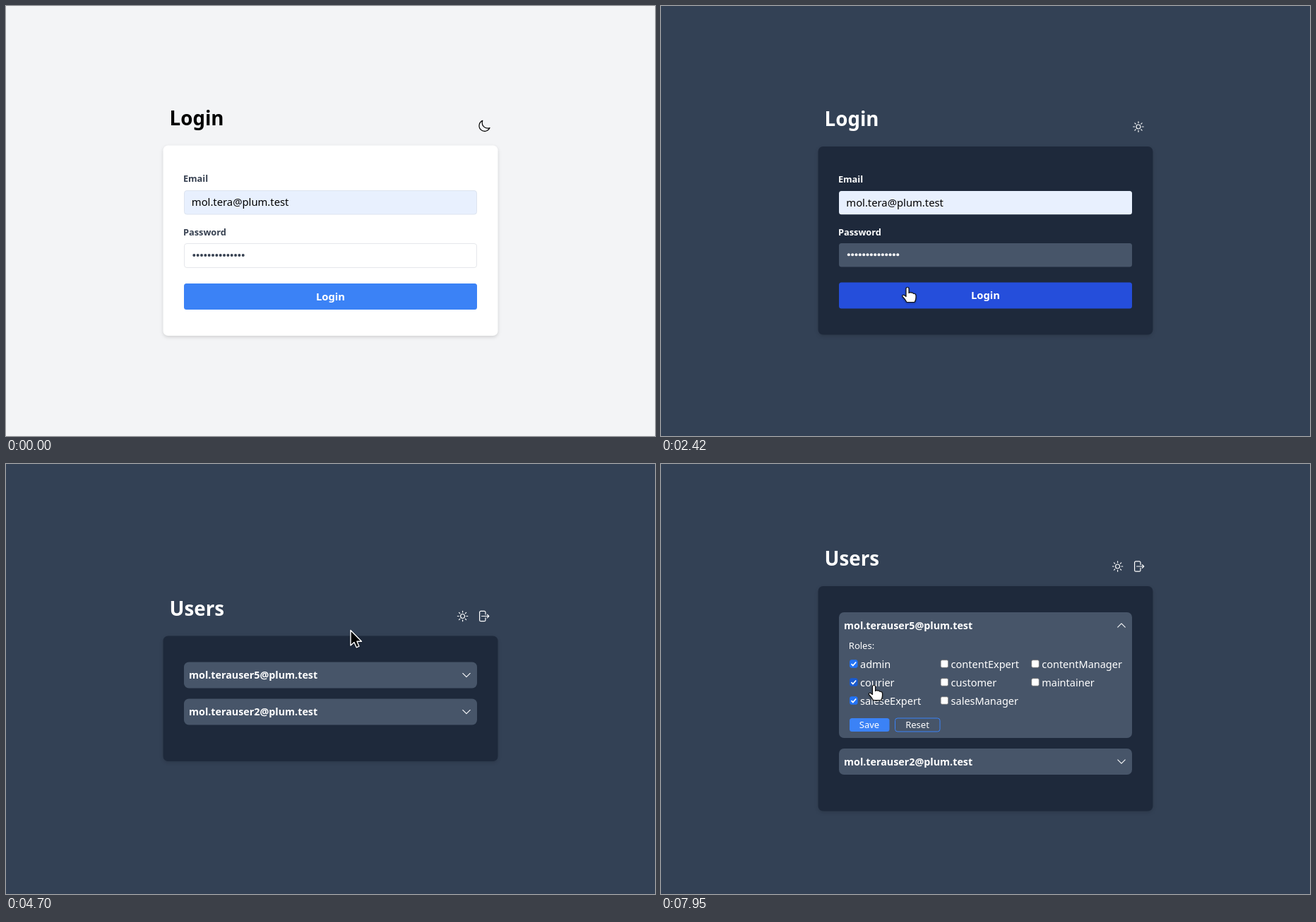
These frames come from a looping animation (919x609 px, 8 s). An HTML page:

```html
<!DOCTYPE html>
<html lang="en">
<head>
<meta charset="utf-8">
<title>Login and user roles</title>
<style>
  html, body { margin: 0; width: 100%; height: 100%; overflow: hidden; }
  svg { display: block; width: 919px; height: 609px; font-family: "Noto Sans", "Open Sans", sans-serif; }
  .card { filter: drop-shadow(0 2px 2.5px rgba(0, 0, 0, .14)); }
  .icon { fill: none; stroke-width: 1.5; stroke-linecap: round; stroke-linejoin: round; }
  #cursor { stroke-linejoin: round; filter: drop-shadow(.5px 1px 1px rgba(0, 0, 0, .35)); }
</style>
</head>
<body>
<svg viewBox="0 0 919 609">
  <g id="page"></g>
  <g id="cursor"></g>
</svg>
<script>
const LOOP = 8000;
const BLUE = '#3b82f6';
const ACCOUNT = 'mol.tera';
const HOST = '@plum.test';
const ROLES = ['admin', 'contentExpert', 'contentManager', 'courier', 'customer',
  'maintainer', 'saleseExpert', 'salesManager'];
const CHECK_TIME = { admin: 0, saleseExpert: 6750, courier: 7780 };

const TOGGLE = 1650, SUBMIT = 4520, LOADED = 4700, EXPAND = 5730;

// Pointer moves: start, end, x, y. Each one eases out from the previous point.
const APPEAR = 150;
const START = [752, 492];
const MOVES = [
  [150, 900, 513, 189],
  [1060, 1530, 671, 165],
  [1880, 2420, 349, 398.5],
  [3090, 3780, 472, 254],
  [3900, 4020, 488, 236.5],
  [4210, 4210, 488, 235.5],
  [4840, 5470, 533.5, 292.5],
  [5940, 6680, 295, 325],
  [7340, 7780, 301.5, 314.5],
  [7950, 7950, 301.5, 313.5]
];

const ICONS = {
  moon: 'M21.75 15A9.72 9.72 0 0 1 18 15.75 9.75 9.75 0 0 1 8.25 6c0-1.33.27-2.6.75-3.75A9.75 9.75 0 1 0 21.75 15Z',
  exit: 'M15.75 9V5.25A2.25 2.25 0 0 0 13.5 3h-6a2.25 2.25 0 0 0-2.25 2.25v13.5A2.25 2.25 0 0 0 7.5 21h6a2.25 2.25 0 0 0 2.25-2.25V15m3 0l3-3-3-3m3 3H9',
  down: 'M19.5 8.25l-7.5 7.5-7.5-7.5',
  up: 'M19.5 15.75l-7.5-7.5-7.5 7.5',
  sun: 'M15.75 12a3.75 3.75 0 1 1-7.5 0 3.75 3.75 0 0 1 7.5 0Z' + Array.from({ length: 8 }, (_, i) => {
    const at = r => `${12 + r * Math.cos(i * Math.PI / 4)} ${12 + r * Math.sin(i * Math.PI / 4)}`;
    return `M${at(6.75)}L${at(9)}`;
  }).join('')
};

const CURSORS = {
  arrow: '<path d="M0 0V21.5L5 17 8.3 24.3 12 22.7 9 15.7H15.5Z" fill="#000" stroke="#fff" stroke-width="1.4"/>',
  hand: '<path d="M-2 2Q-2 0 0 0T2 2V8Q3.5 6.6 5 7.6 7.2 7 8.3 8.8 11.6 8.4 12 11.4V14.5Q12 18 10 21H-1Q-3.5 16.5-7 13-7.8 10.4-5 10.8L-2 13Z" fill="#fff" stroke="#111" stroke-width="1.2"/>',
  text: '<path d="M-3-8Q0-8 0-6 0-8 3-8M0-6V6M-3 8Q0 8 0 6 0 8 3 8" fill="none" stroke="#fff" stroke-width="3"/>' +
    '<path d="M-3-8Q0-8 0-6 0-8 3-8M0-6V6M-3 8Q0 8 0 6 0 8 3 8" fill="none" stroke="#000" stroke-width="1.3"/>'
};

const rect = (x, y, w, h, r, fill, more = '') =>
  `<rect x="${x}" y="${y}" width="${w}" height="${h}" rx="${r}" fill="${fill}" ${more}/>`;
const text = (str, x, y, size, fill, weight = 400, anchor = 'start') =>
  `<text x="${x}" y="${y}" font-size="${size}" font-weight="${weight}" fill="${fill}" text-anchor="${anchor}">${str}</text>`;
const icon = (name, x, y, color, scale = .8) =>
  `<path class="icon" d="${ICONS[name]}" stroke="${color}" transform="translate(${x} ${y}) scale(${scale}) translate(-12 -12)"/>`;
const card = (y, h, fill) => rect(222.5, y, 474, h, 7, fill, 'class="card"');
const field = (y, h, fill, stroke) => stroke
  ? rect(252.5, y + .5, 414, h - 1, 3.5, fill, `stroke="${stroke}"`)
  : rect(252, y, 415, h, 3.5, fill);

function loginPage(dark, hover) {
  const ink = dark ? '#fff' : '#374151';
  const pick = (onDark, onLight) => dark ? onDark : onLight;
  const dotX = pick(265.8, 266.3), dotY = pick(352.3, 353);
  const dots = Array.from({ length: 14 }, (_, i) =>
    `<circle cx="${dotX + i * 5.34}" cy="${dotY}" r="2" fill="${ink}"/>`).join('');
  const buttonY = pick(391.5, 393);
  return text('Login', 231.6, pick(170, 168.8), 27.7, pick('#fff', '#000'), 700) +
    (dark ? icon('sun', 676, 171, '#fff') : icon('moon', 677.2, 170.2, '#000')) +
    (dark ? card(199, 266.5, '#1e293b') : card(197.5, 269.5, '#fff')) +
    text('Email', 250.9, pick(250.2, 249), 12.8, ink, 700) +
    field(pick(262, 261), pick(33.3, 34.5), '#e8f0fe', pick('', '#dde4ef')) +
    text(ACCOUNT + HOST, pick(262.3, 262.8), pick(283.8, 283.2), 14.8, '#000') +
    text('Password', 250.9, 324.5, 12.8, ink, 700) +
    field(336, pick(33.5, 35), pick('#475569', '#fff'), pick('', '#e5e7eb')) + dots +
    rect(252, buttonY, 415, 37, 3.5, hover ? '#254edb' : BLUE) +
    text('Login', 459.5, buttonY + 23.7, 14.8, '#fff', 700, 'middle');
}

function checkbox(x, y, checked, hover) {
  const fill = checked ? (hover ? '#1a5bd0' : '#2373f5') : '#fff';
  const line = checked ? fill : (hover ? '#4f4f4f' : '#767676');
  return rect(x - 5.3, y - 5.3, 10.6, 10.6, 2, fill, `stroke="${line}" stroke-width=".9"`) +
    (checked ? `<path d="M${x - 3.3} ${y + .2}l2.3 2.3 4.4-5" fill="none" stroke="#fff" stroke-width="1.7"/>` : '');
}

function rolePanel(time, hoverRole) {
  const items = ROLES.map((role, i) => {
    const x = 272.8 + i % 3 * 128.6, y = 283 + Math.floor(i / 3) * 26;
    return checkbox(x, y, time >= CHECK_TIME[role], i === hoverRole) +
      text(role, x + 9.2, y + 6.1, 14.5, '#fff');
  }).join('');
  return text('Roles:', 265.8, 261.5, 13, '#fff') + items +
    rect(267, 360, 56.5, 19, 3.5, BLUE) +
    text('Save', 295, 374.4, 13, '#fff', 400, 'middle') +
    rect(331.5, 360, 63.5, 19, 3.5, 'none', `stroke="${BLUE}"`) +
    text('Reset', 363, 374.4, 13, '#fff', 400, 'middle');
}

function userRow(y, h, id, chevron) {
  return rect(252, y, 415, h, 7, '#475569') +
    text(`${ACCOUNT}user${id}${HOST}`, 259, y + 23.6, 14.3, '#fff', 700) +
    icon(chevron, 652, y + 18.6, '#fff', .7);
}

function usersPage(time, hoverRole) {
  const loaded = time >= LOADED, open = time >= EXPAND;
  const top = open ? 173 : loaded ? 243.5 : 295.5;
  const height = 2 * (307 - top) + 50.5;
  let out = text('Users', 231.6, top - 28.7, 27.7, '#fff', 700) +
    icon('sun', 646.6, top - 28, '#fff') + icon('exit', 676, top - 28, '#fff') +
    card(top, open ? 318.5 : loaded ? 177.5 : height - 0.5, '#1e293b');
  if (loaded) {
    const first = open ? 178 : 37;
    out += userRow(top + 37, first, 5, open ? 'up' : 'down') +
      userRow(top + 52 + first, 37, 2, 'down');
  }
  return out + (open ? rolePanel(time, hoverRole) : '');
}

function pointerAt(time) {
  let [x, y] = START;
  for (const [from, to, nextX, nextY] of MOVES) {
    if (time < from) break;
    const left = to > from ? Math.max(0, (to - time) / (to - from)) : 0;
    const k = 1 - left * left;
    x += (nextX - x) * k;
    y += (nextY - y) * k;
  }
  return [x, y];
}

const within = (v, low, high) => v >= low && v <= high;

function cursorKind(time, x, y) {
  const inColumn = within(x, 252, 667);
  if (time < SUBMIT) {
    if (within(x, 664, 688) && within(y, 158, 182)) return 'hand';
    if (inColumn && within(y, 392, 430)) return 'hand';
    if (inColumn && (within(y, 262, 295) || within(y, 336, 370))) return 'text';
    return 'arrow';
  }
  const rowTop = time >= EXPAND ? 210 : 280;
  return time >= LOADED && inColumn && y > rowTop ? 'hand' : 'arrow';
}

const page = document.getElementById('page');
const cursor = document.getElementById('cursor');
let shown = '';

function render(time) {
  const [x, y] = pointerAt(time);
  const kind = cursorKind(time, x, y);
  const dark = time >= TOGGLE;
  const hoverButton = time >= APPEAR && kind === 'hand' && y > 380;
  const hoverRole = Math.floor((y - 270) / 26) * 3 + Math.floor((x - 267) / 128.6);
  const markup = rect(0, 0, 919, 609, 0, dark ? '#334155' : '#f3f4f6') +
    (time < SUBMIT ? loginPage(dark, hoverButton) : usersPage(time, hoverRole));
  if (markup !== shown) page.innerHTML = shown = markup;
  cursor.innerHTML = time < APPEAR ? '' : CURSORS[kind];
  cursor.setAttribute('transform', `translate(${x.toFixed(1)} ${y.toFixed(1)})`);
}

const began = performance.now();
function tick() {
  render((performance.now() - began) % LOOP);
  requestAnimationFrame(tick);
}
tick();
</script>
</body>
</html>
```
